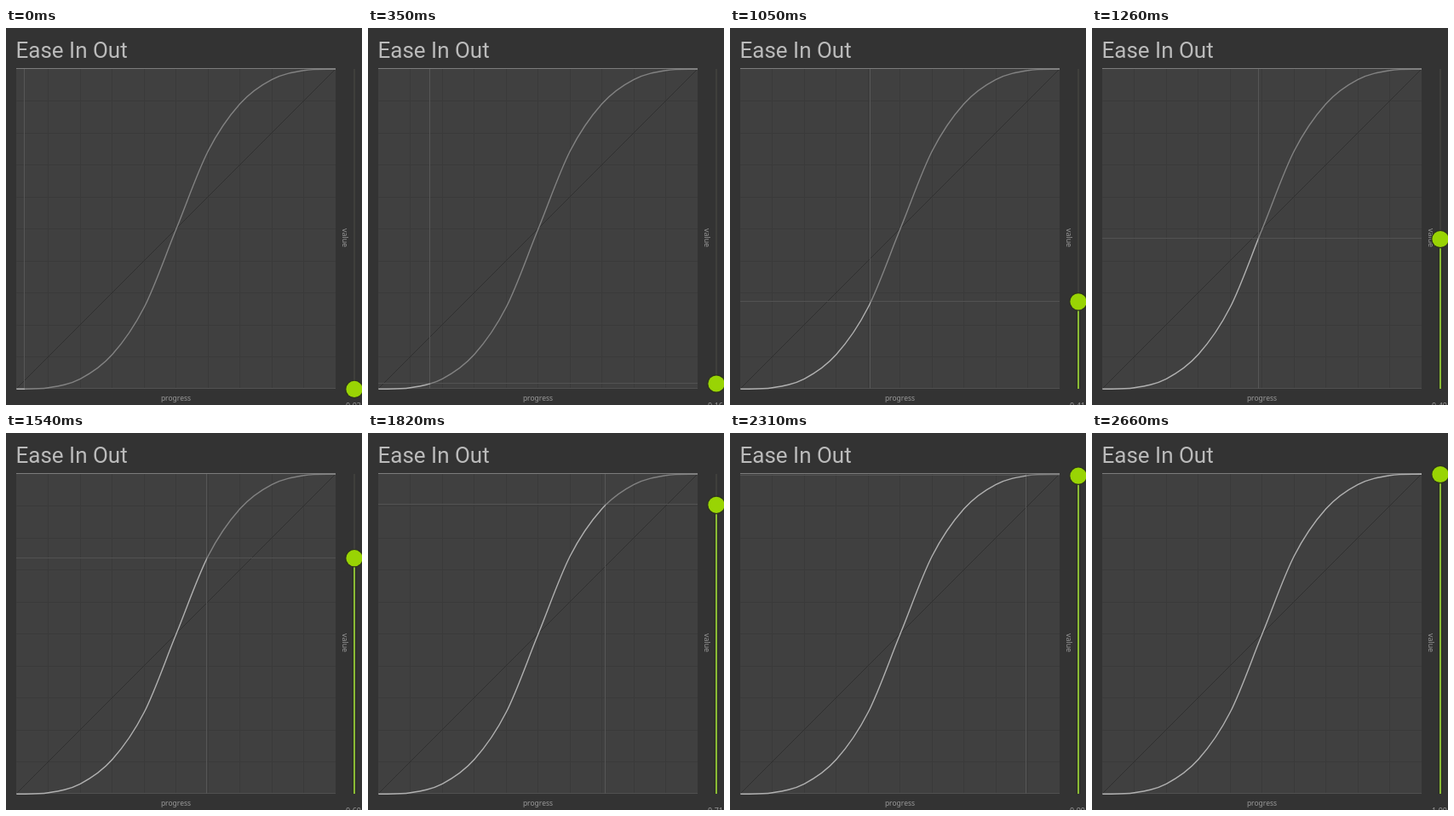
These frames come from a looping animation (418 by 442 pixels, 2940 ms). An HTML page with a canvas:

```html
<!DOCTYPE html>
<html lang="en">
<head>
<meta charset="utf-8">
<title>Ease In Out</title>
<style>
html, body { margin: 0; height: 100%; overflow: hidden; background: #333; }
canvas { display: block; }
</style>
</head>
<body>
<canvas width="418" height="442"></canvas>
<script>
const ctx = document.querySelector('canvas').getContext('2d');
const LOOP = 2940, STEP = 70;
const LEFT = 12, TOP = 48, SIZE = 375, RIGHT = LEFT + SIZE, BOTTOM = TOP + SIZE;
const CELLS = 10, SLIDER_X = 409;
// [time in ms, progress]
const keys = [[0, .0267], [630, .272], [1050, .409], [1540, .597], [1820, .712], [2310, .896], [2660, 1]];

const ease = p => p < .5 ? 4 * p ** 3 : 1 - 4 * (1 - p) ** 3;
const px = p => LEFT + p * SIZE;
const py = v => BOTTOM - v * SIZE;
const crisp = n => Math.floor(n) + .5;

function progressAt(t) {
  const i = keys.findIndex(k => k[0] > t);
  if (i < 0) return 1;
  const [t0, p0] = keys[i - 1], [t1, p1] = keys[i];
  return p0 + (p1 - p0) * (t - t0) / (t1 - t0);
}

function line(x1, y1, x2, y2, color, width = 1) {
  ctx.strokeStyle = color;
  ctx.lineWidth = width;
  ctx.beginPath();
  ctx.moveTo(x1, y1);
  ctx.lineTo(x2, y2);
  ctx.stroke();
}

// Smooth spline through one sample per grid cell
function buildCurve() {
  const path = new Path2D();
  const sample = i => ease(Math.min(1, Math.max(0, i / CELLS)));
  const rise = i => (sample(i + 1) - sample(i - 1)) / 6;
  path.moveTo(px(0), py(0));
  for (let i = 0; i < CELLS; i++) {
    path.bezierCurveTo(
      px((i + 1 / 3) / CELLS), py(sample(i) + rise(i)),
      px((i + 2 / 3) / CELLS), py(sample(i + 1) - rise(i + 1)),
      px((i + 1) / CELLS), py(sample(i + 1)));
  }
  return path;
}
const curve = buildCurve();

function strokeCurve(from, to, color) {
  ctx.save();
  ctx.beginPath();
  ctx.rect(px(from), 0, (to - from) * SIZE, 442);
  ctx.clip();
  ctx.translate(.3, .3);
  ctx.strokeStyle = color;
  ctx.lineWidth = 1.4;
  ctx.stroke(curve);
  ctx.restore();
}

function text(str, x, y, font, color, align = 'left', angle = 0) {
  ctx.save();
  ctx.translate(x, y);
  ctx.rotate(angle);
  ctx.font = `${font}, sans-serif`;
  ctx.textAlign = align;
  ctx.fillStyle = color;
  ctx.fillText(str, 0, 0);
  ctx.restore();
}

function drawPlot(p) {
  const x = Math.round(px(p)) - .5, y = crisp(py(ease(p)));
  ctx.fillStyle = '#404040';
  ctx.fillRect(LEFT, TOP, SIZE, SIZE);
  for (let i = 1; i < CELLS; i++) {
    const d = i * SIZE / CELLS;
    line(crisp(LEFT + d), TOP, crisp(LEFT + d), BOTTOM, '#3a3a3a');
    line(LEFT, crisp(TOP + d), RIGHT, crisp(TOP + d), '#3a3a3a');
  }
  line(LEFT, BOTTOM, RIGHT, TOP, '#303030');
  line(LEFT, BOTTOM - .5, RIGHT, BOTTOM - .5, '#505050');
  if (p < 1) {
    line(x, TOP, x, BOTTOM, '#565656');
    line(LEFT, y, RIGHT, y, '#525252');
  }
  line(LEFT, TOP - .5, RIGHT, TOP - .5, '#7c7c7c');
  strokeCurve(p, 1, '#828282');
  strokeCurve(0, p, '#b0b0b0');
}

function drawSlider(p) {
  const y = py(ease(p));
  line(SLIDER_X, TOP, SLIDER_X, BOTTOM, '#444440', 1.5);
  line(SLIDER_X, y, SLIDER_X, BOTTOM, '#2e3028', 5);
  line(SLIDER_X, y, SLIDER_X, BOTTOM, '#8abb35', 2);
  ctx.fillStyle = '#99d404';
  ctx.strokeStyle = '#2e3420';
  ctx.lineWidth = 2.4;
  ctx.beginPath();
  ctx.arc(SLIDER_X, y + .5, 9.6, 0, 2 * Math.PI);
  ctx.stroke();
  ctx.fill();
  text(p.toFixed(2), SLIDER_X - 1, 445.5, '9px "Noto Sans"', '#999', 'center');
}

function draw(now) {
  const t = Math.floor(now % LOOP / STEP) * STEP;
  const p = progressAt(t);
  ctx.fillStyle = '#333';
  ctx.fillRect(0, 0, 418, 442);
  text('Ease In Out', 11.5, 35, '26px Roboto', '#bbb');
  drawPlot(p);
  text('progress', 199.5, 437, '8.5px "Noto Sans"', '#999', 'center');
  text('value', 394.5, 235, '8.8px "Noto Sans"', '#999', 'left', Math.PI / 2);
  drawSlider(p);
}

const start = performance.now();
function tick() {
  draw(performance.now() - start);
  requestAnimationFrame(tick);
}
tick();
</script>
</body>
</html>
```
